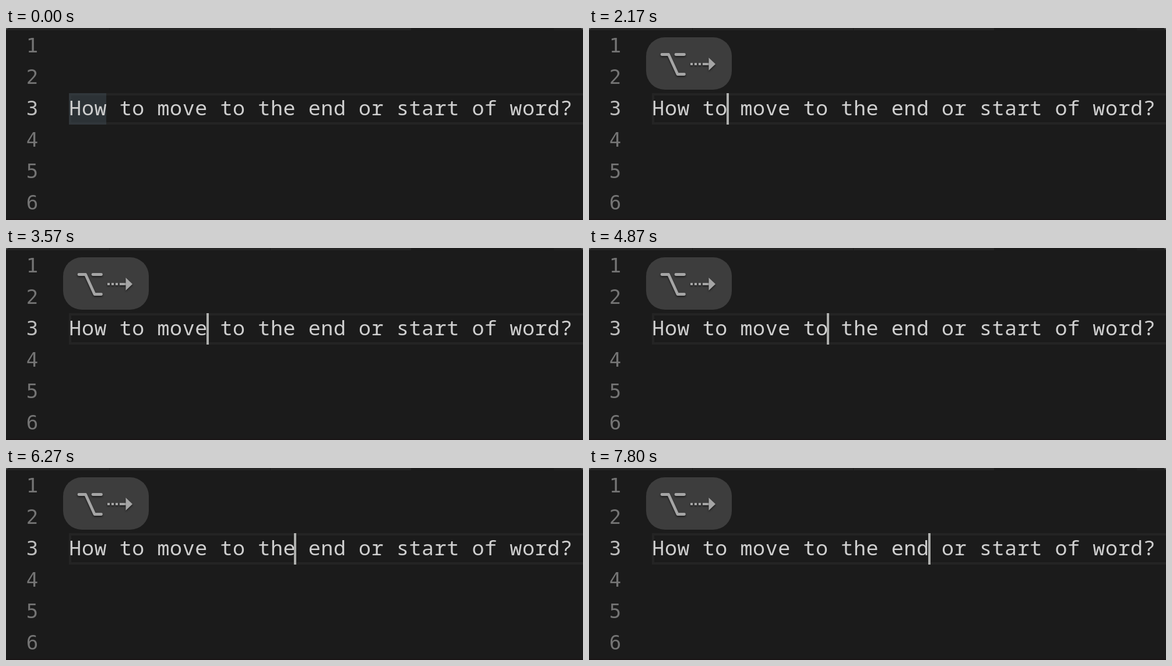
Write an HTML page with a canvas that moves like this. It is 990 by 330 pixels and loops after 8000 ms.

```html
<!DOCTYPE html>
<html lang="en">
<head>
<meta charset="utf-8">
<title>Moving by word</title>
<style>
  html, body { margin: 0; width: 100%; height: 100%; overflow: hidden; background: #1b1b1b; }
  canvas { display: block; }
</style>
</head>
<body>
<canvas id="stage" width="990" height="330"></canvas>
<script>
const W = 990, H = 330, LOOP = 8000;
const ROW = 54, TOP = 4, LEFT = 108, ADVANCE = 21.6, BASELINE = 38;
const LINE = 'How to move to the end or start of word?';
const BG = '#1b1b1b', ICON = '#a5a5a5';
const BLINK = 500, FADE_START = 890, FADE_END = 1100, FRAME = 100 / 3;

// Each key press moves the caret to the next word end.
const presses = [700, 2170, 3570, 4870, 6270, 7770];
const wordEnds = [...LINE.matchAll(/\w+/g)].map(m => m.index + m[0].length);

const ctx = document.getElementById('stage').getContext('2d');

function rect(c, color, x, y, w, h) {
  c.fillStyle = color;
  c.fillRect(x, y, w, h);
}

function polyline(c, points) {
  c.beginPath();
  points.forEach(([x, y]) => c.lineTo(x, y));
}

function makeBadge() {
  const badge = document.createElement('canvas');
  badge.width = W;
  badge.height = 112;
  const c = badge.getContext('2d');
  c.fillStyle = '#3d3d3d';
  c.beginPath();
  c.roundRect(98, 16, 147, 90, 32);
  c.fill();

  c.shadowColor = 'rgba(0,0,0,.55)';
  c.shadowBlur = 3;
  c.shadowOffsetY = 2;
  c.strokeStyle = ICON;
  c.lineWidth = 4.8;
  c.lineCap = c.lineJoin = 'round';
  polyline(c, [[125, 45.5], [136.5, 45.5], [152, 79.5], [163.5, 79.5]]);
  c.stroke();
  polyline(c, [[149, 45.5], [163.5, 45.5]]);
  c.stroke();

  for (const x of [174, 181, 188]) rect(c, ICON, x, 60, 4, 4);
  rect(c, ICON, 195, 60, 11, 4);
  polyline(c, [[205.5, 51], [217, 62], [205.5, 73]]);
  c.fill();
  return badge;
}

const badge = makeBadge();

function drawChrome() {
  rect(ctx, BG, 0, 0, W, H);
  rect(ctx, '#252525', 0, 0, 695, 4);
  rect(ctx, '#202020', 940, 0, 50, 4);
  for (const x of [177, 453]) rect(ctx, BG, x, 0, 1, 4);
  rect(ctx, '#191415', 0, 328, W, 2);
  ctx.fillStyle = '#505050';
  for (const [x, dir] of [[0, 1], [W, -1]]) {
    polyline(ctx, [[x, 0], [x + 4 * dir, 0], [x, 3]]);
    ctx.fill();
  }
}

function drawCurrentLine(selected) {
  const y = TOP + 2 * ROW;
  rect(ctx, '#242424', LEFT, y, W - LEFT, ROW);
  rect(ctx, BG, LEFT + 4, y + 4, W - LEFT - 4, ROW - 8);
  if (selected) rect(ctx, 'rgba(63,75,83,.5)', LEFT, y, 64, ROW);
}

function drawText() {
  ctx.letterSpacing = '0px';
  ctx.font = '34px "DejaVu Sans Mono", monospace';
  for (let n = 1; n <= 6; n++) {
    ctx.fillStyle = n === 3 ? '#bcbcbc' : '#747474';
    ctx.fillText(n, 34.8, TOP + (n - 1) * ROW + BASELINE);
  }
  ctx.font = '35px "Noto Sans Mono", monospace';
  ctx.letterSpacing = '0.6px';
  ctx.fillStyle = '#cfcfcf';
  ctx.fillText(LINE, LEFT + 0.3, TOP + 2 * ROW + BASELINE);
}

function drawCaret(t, press) {
  const first = press < 0;
  const age = first ? t : t - presses[press];
  const on = first ? t >= 370 : age % (2 * BLINK) < BLINK;
  if (!on) return;
  const col = first ? 0 : wordEnds[press];
  const x = 2 * (Math.round((LEFT + col * ADVANCE) / 2) - (col ? 1 : 0));
  rect(ctx, '#aeafad', x, TOP + 2 * ROW, 4, ROW);
}

function badgeAlpha(age) {
  const stepped = Math.floor((age + 4) / FRAME) * FRAME;
  return Math.max(0, Math.min(1, (FADE_END - stepped) / (FADE_END - FADE_START)));
}

function draw(t) {
  const press = presses.filter(p => p <= t).length - 1;
  drawChrome();
  drawCurrentLine(press < 0);
  drawText();
  drawCaret(t, press);
  if (press >= 0) {
    ctx.globalAlpha = badgeAlpha(t - presses[press]);
    ctx.drawImage(badge, 0, 0);
    ctx.globalAlpha = 1;
  }
}

const start = performance.now();
function tick() {
  draw((performance.now() - start) % LOOP);
  requestAnimationFrame(tick);
}
tick();
</script>
</body>
</html>
```
